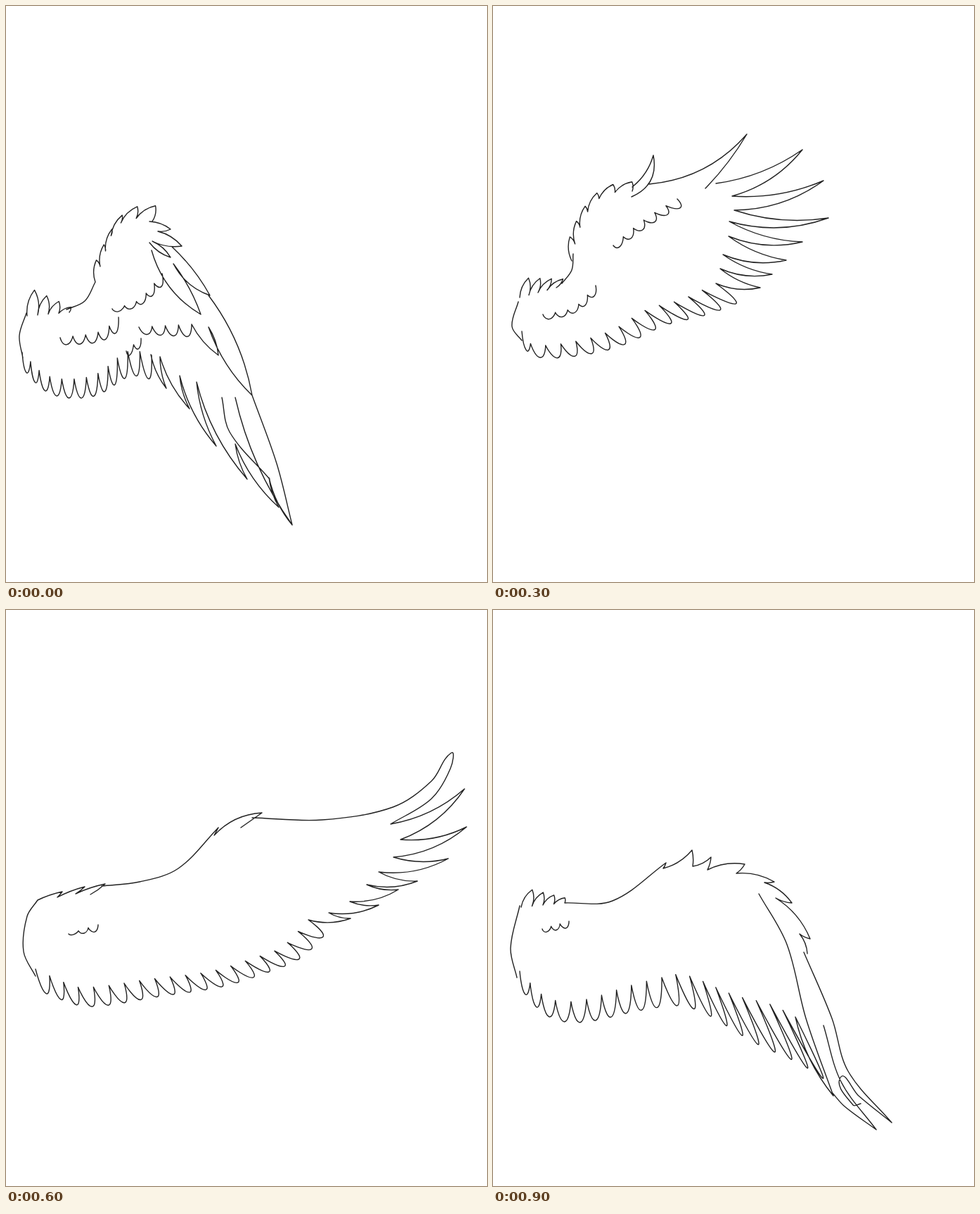
Write an HTML page that moves like this. It is 684 px wide and 818 px high and loops after 1000 ms.

```html
<!DOCTYPE html>
<html lang="en">
<head>
<meta charset="utf-8">
<title>Wing beat</title>
<style>
  html, body { margin: 0; width: 100%; height: 100%; overflow: hidden; background: #fff; }
  svg { display: block; width: 100%; height: 100%; }
  path { fill: none; stroke: #222; stroke-width: 1.4; stroke-linecap: round; stroke-linejoin: round; }
</style>
</head>
<body>
<svg viewBox="0 0 684 818"><path id="wing"/></svg>
<script>
const STEP = 100;
const ruler = document.createElementNS("http://www.w3.org/2000/svg", "path");
let ink = "", droop = 0;

// Pairs up flat coordinates and bends the wing beyond the shoulder.
function points(flat) {
  const out = [];
  for (let i = 0; i < flat.length; i += 2) {
    const reach = Math.max(0, flat[i] - 120) / 500;
    out.push([flat[i], flat[i + 1] + droop * reach * reach]);
  }
  return out;
}

const mix = (a, b, k) => [a[0] + (b[0] - a[0]) * k, a[1] + (b[1] - a[1]) * k];
const add = (a, b, k = 1) => [a[0] + b[0] * k, a[1] + b[1] * k];
const at = p => p.map(v => v.toFixed(1)).join();

function smooth(pts) {
  let d = "M" + at(pts[0]);
  for (let i = 1; i < pts.length; i++) {
    const a = pts[i - 1], b = pts[i];
    const before = pts[i - 2] || a, after = pts[i + 1] || b;
    const len = Math.hypot(b[0] - a[0], b[1] - a[1]) * 0.34;
    const handle = (p, q) => {
      const v = [q[0] - p[0], q[1] - p[1]];
      return add([0, 0], v, len / (Math.hypot(...v) || 1));
    };
    d += `C${at(add(a, handle(before, b)))} ${at(add(b, handle(a, after), -1))} ${at(b)}`;
  }
  return d;
}

function line(flat) {
  ink += smooth(points(flat));
}

// Sharp zigzag whose sides bow to the left of travel.
function zigzag(pts, out, back) {
  ink += "M" + at(pts[0]);
  for (let i = 1; i < pts.length; i++) {
    const a = pts[i - 1], b = pts[i], bow = 2 * (i % 2 ? out : back);
    const ctrl = add(mix(a, b, 0.5), [b[1] - a[1], a[0] - b[0]], bow);
    ink += `Q${at(ctrl)} ${at(b)}`;
  }
}

function blades(flat, out = 0.08, back = 0.08) {
  zigzag(points(flat), out, back);
}

// Splits a curve into n roots, each with a tip offset running from v0 to v1.
function row(flat, n, v0, v1, each) {
  ruler.setAttribute("d", smooth(points(flat)));
  const total = ruler.getTotalLength();
  const root = i => {
    const p = ruler.getPointAtLength(total * i / n);
    return [p.x, p.y];
  };
  for (let i = 0; i < n; i++) {
    const a = root(i), c = root(i + 1);
    each(a, add(mix(a, c, 0.5), mix(v0, v1, i / (n - 1))), c);
  }
}

function spikes(flat, n, v0, v1) {
  row(flat, n, v0, v1, (a, tip, c) => zigzag([a, tip, c], 0.1, 0.1));
}

function fringe(flat, n, v0, v1) {
  row(flat, n, v0, v1, (a, tip, c) => {
    const side = [c[0] - a[0], c[1] - a[1]];
    ink += `M${at(a)}C${at(a)} ${at(add(tip, side, -0.36))} ${at(tip)}`;
    ink += `C${at(add(tip, side, 0.36))} ${at(c)} ${at(c)}`;
  });
}

function folded() {
  line([29, 436, 19, 468, 24, 500]);
  spikes([30, 440, 90, 435], 4, [3, -36], [10, -8]);
  line([86, 431, 112, 419, 127, 392]);
  spikes([127, 392, 140, 352, 156, 315, 178, 302, 208, 306], 6, [-2, -20], [16, -20]);
  blades([204, 306, 234, 317, 216, 320, 250, 341, 208, 334, 234, 357, 204, 336]);
  blades([236, 342, 290, 411, 238, 366, 277, 438, 207, 347], 0.04, 0.1);
  blades([288, 411, 350, 553, 288, 456, 302, 496, 264, 452], 0.06, 0.06);
  line([350, 553, 385, 650, 407, 737]);
  fringe([189, 456, 264, 452], 4, [2, 11], [3, 17]);
  fringe([151, 430, 188, 418, 222, 380], 5, [0, 6], [5, 11]);
  fringe([77, 471, 135, 462, 160, 442], 5, [0, 11], [3, 16]);
  fringe([171, 490, 192, 472], 2, [0, 10], [2, 10]);
  fringe([23, 492, 55, 523, 90, 530, 130, 522, 175, 490, 207, 496], 12, [0, 22], [4, 36]);
  blades([206, 495, 228, 543, 219, 498, 261, 572, 247, 525, 299, 625, 271, 534,
    343, 672, 326, 622, 388, 712, 374, 670, 407, 737, 326, 556], -0.06, 0.05);
  line([307, 556, 318, 605, 375, 672]);
}

function opening() {
  line([32, 425, 17, 470, 28, 510]);
  spikes([26, 440, 96, 414], 4, [11, -35], [14, -17]);
  line([97, 408, 115, 385, 122, 360]);
  spikes([118, 390, 128, 340, 140, 310, 156, 292, 190, 284, 208, 290], 7, [1, -20], [17, -18]);
  blades([200, 288, 227, 291, 194, 303, 222, 302, 198, 314]);
  line([216, 291, 268, 321, 339, 385, 385, 447, 414, 520, 424, 607]);
  blades([247, 316, 268, 321]);
  blades([289, 346, 308, 353]);
  blades([320, 372, 339, 385], -0.1);
  blades([424, 607, 358, 458], -0.05);
  line([358, 458, 378, 522, 405, 545]);
  line([335, 424, 365, 490, 382, 550, 381, 603]);
  blades([381, 603, 325, 455], -0.04);
  line([292, 390, 325, 455, 332, 550]);
  blades([332, 550, 284, 430], -0.06);
  line([325, 455, 340, 510, 362, 535]);
  blades([204, 315, 284, 430, 237, 331], -0.01, -0.03);
  fringe([145, 410, 190, 380, 224, 342], 7, [3, 8], [-1, 14]);
  line([224, 342, 206, 318]);
  fringe([55, 449, 110, 450, 148, 418], 6, [0, 9], [2, 14]);
  fringe([22, 478, 40, 508, 97, 513, 145, 500, 200, 484, 265, 467, 320, 488], 15, [0, 22], [0, 38]);
}

function rising() {
  line([36, 420, 27, 455, 41, 475]);
  spikes([38, 414, 90, 400], 4, [6, -26], [16, -14]);
  line([98, 394, 112, 375, 114, 352]);
  spikes([112, 362, 120, 325, 136, 290, 160, 268, 198, 263], 6, [-5, -22], [12, -14]);
  blades([198, 257, 228, 212, 197, 271], -0.08, 0.2);
  blades([222, 253, 361, 182, 302, 259], -0.1, 0.03);
  blades([317, 252, 440, 204, 340, 270, 470, 248, 343, 290, 477, 301, 336, 306, 440, 335,
    335, 327, 417, 361, 327, 353, 397, 381, 323, 373, 380, 400, 317, 394], -0.06, 0.08);
  fringe([171, 340, 217, 302, 262, 274], 6, [2, 8], [12, 8]);
  fringe([71, 438, 115, 428, 146, 397], 5, [0, 8], [4, 8]);
  fringe([317, 394, 268, 417, 219, 431, 166, 462, 108, 478, 55, 480, 41, 462], 14, [38, 24], [0, 18]);
}

function raised() {
  line([32, 488, 22, 466, 15, 456, 30, 440]);
  spikes([26, 454, 66, 410, 120, 392], 4, [22, -28], [14, -9]);
  line([123, 386, 168, 357, 193, 293]);
  blades([187, 320, 202, 292, 200, 318, 216, 244, 216, 279, 242, 204, 234, 243, 280, 168, 251, 223], 0.03, 0.1);
  blades([274, 183, 390, 82, 341, 167], -0.12, 0.08);
  blades([345, 165, 503, 15, 407, 155, 536, 48, 432, 179, 539, 113, 435, 207, 530, 168, 429, 253,
    520, 206, 426, 283, 514, 250, 434, 306, 488, 288, 410, 334, 457, 330, 406, 360, 429, 360, 382, 377], -0.05, 0.1);
  fringe([260, 275, 276, 247, 305, 207], 4, [10, 2], [14, 4]);
  fringe([117, 418, 150, 410, 185, 386], 4, [2, 6], [8, 8]);
  fringe([382, 377, 367, 398, 328, 416, 285, 425, 238, 434, 178, 457, 131, 470, 80, 480, 30, 478], 14, [38, 6], [0, 20]);
}

function spread() {
  line([42, 520, 25, 485, 30, 435, 45, 412]);
  blades([45, 412, 80, 400, 73, 408, 112, 393, 99, 403, 141, 389, 120, 404], 0.03, 0.03);
  line([136, 392, 190, 386, 245, 367, 302, 309]);
  blades([302, 309, 296, 320, 364, 288, 334, 309], 0, 0.1);
  line([350, 295, 450, 298, 550, 280, 605, 243, 633, 203, 632, 225, 605, 268, 547, 304]);
  blades([547, 304, 652, 254, 561, 326, 655, 308, 551, 351, 629, 353, 530, 372, 585, 385,
    513, 390, 558, 397, 489, 414, 530, 419, 459, 430, 490, 438, 430, 440], -0.07, 0.08);
  fringe([89, 460, 131, 447], 3, [0, 3], [2, 8]);
  fringe([430, 440, 393, 478, 350, 495, 292, 513, 207, 524, 106, 536, 68, 522, 42, 510], 19, [28, 16], [5, 30]);
}

function falling() {
  line([42, 548, 20, 515, 17, 475, 46, 400]);
  spikes([46, 402, 108, 400], 5, [4, -12], [14, -4]);
  line([98, 405, 140, 407, 215, 392, 264, 357]);
  blades([264, 357, 258, 367, 337, 364, 306, 369], 0.04, 0.1);
  blades([330, 367, 397, 372, 357, 380, 427, 411, 373, 402], 0.04, 0.1);
  line([420, 415, 480, 468, 550, 543, 580, 557, 602, 540, 603, 519]);
  line([603, 519, 607, 540, 575, 561, 530, 532, 482, 490]);
  line([451, 490, 510, 530, 565, 552]);
  line([560, 553, 510, 552, 437, 512]);
  fringe([48, 442, 104, 447], 4, [0, 8], [0, 10]);
  fringe([437, 512, 383, 525, 295, 538], 8, [48, 44], [16, 46]);
  fringe([295, 538, 238, 555, 190, 568, 112, 551, 57, 525, 30, 497], 15, [0, 34], [0, 20]);
}

function folding() {
  line([34, 522, 25, 480, 38, 420]);
  spikes([40, 422, 102, 416], 4, [8, -24], [8, -8]);
  line([102, 416, 170, 413, 246, 359]);
  blades([246, 359, 242, 367, 283, 341, 284, 364, 310, 351, 305, 369], 0.05, -0.08);
  blades([305, 369, 358, 361, 346, 374, 400, 386, 386, 387, 425, 416, 402, 409, 451, 467, 436, 460, 447, 488], 0.08, 0.06);
  line([442, 486, 482, 580, 505, 655, 567, 728]);
  line([567, 728, 520, 690, 494, 664, 512, 703, 523, 701]);
  line([470, 590, 495, 670, 545, 738]);
  line([545, 738, 500, 705, 482, 685]);
  line([378, 403, 418, 475, 445, 580, 484, 690]);
  blades([484, 690, 430, 578], 0.06);
  fringe([70, 453, 108, 442], 3, [0, 6], [2, 8]);
  fringe([430, 578, 394, 560, 343, 547, 272, 518, 240, 522], 10, [48, 92], [12, 42]);
  fringe([240, 522, 200, 532, 122, 555, 76, 550, 38, 513], 10, [4, 40], [0, 24]);
}

function trace(pose, bend = 0) {
  ink = "";
  droop = bend;
  pose();
  return ink;
}

const beat = [
  trace(folded), trace(opening), trace(rising, 330), trace(rising), trace(raised),
  trace(spread, -95), trace(spread), trace(falling, -150), trace(falling), trace(folding)
];

const wing = document.getElementById("wing");
const start = performance.now();
let shown = -1;

function tick() {
  const next = Math.floor((performance.now() - start) / STEP) % beat.length;
  if (next !== shown) wing.setAttribute("d", beat[shown = next]);
  requestAnimationFrame(tick);
}
tick();
</script>
</body>
</html>
```
